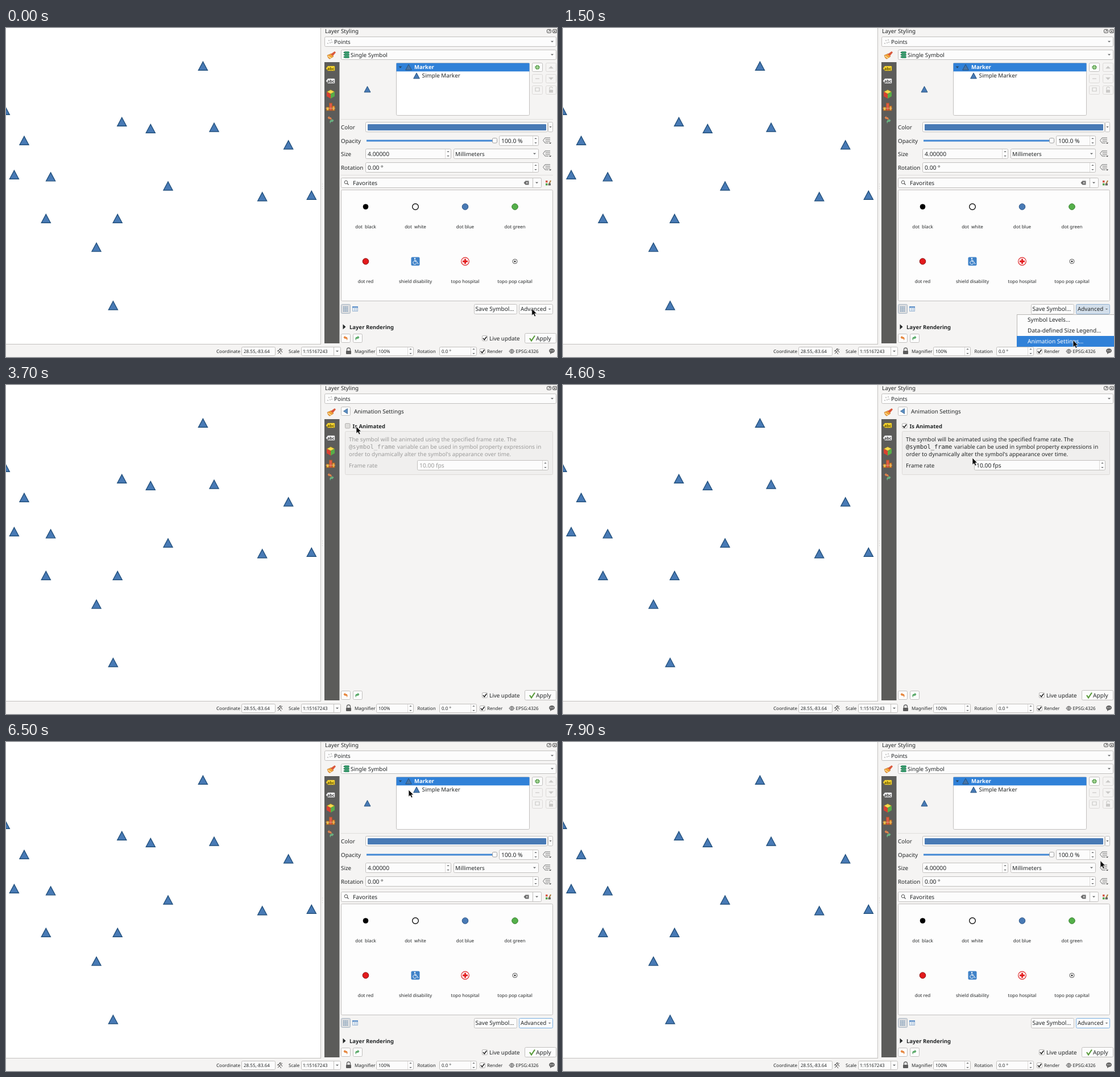
An HTML page for the animation above (8000 ms loop, 969 by 578 pixels).

```html
<!DOCTYPE html>
<html lang="en">
<head>
<meta charset="utf-8">
<title>Layer styling</title>
<style>
html, body { margin: 0; width: 100%; height: 100%; overflow: hidden; background: #f5f4f3; }
svg { display: block; width: 969px; height: 578px; }
text { font-family: "Noto Sans", sans-serif; font-size: 9.85px; fill: #232627; white-space: pre; text-rendering: geometricPrecision; }
.small { font-size: 8.05px; }
.bold { font-size: 9.5px; font-weight: 700; }
.wide { font-size: 10.15px; }
.value { font-size: 10.3px; }
.mono { font-family: "DejaVu Sans Mono", monospace; font-size: 10.4px; }
.tag { font-size: 7px; font-weight: 700; }
#group text { fill: inherit; }
</style>
</head>
<body>
<svg id="stage" viewBox="0 0 969 578"></svg>
<script>
const LOOP = 8000, STEP = 100;
const BLUE = '#487ab5', EDGE = '#24527f', LINE = '#c2c0be', SELECT = '#3081d8';

const rect = (x, y, w, h, fill, stroke = 'none', r = 0, extra = '') =>
  `<rect x="${x}" y="${y}" width="${w}" height="${h}" rx="${r}" fill="${fill}" stroke="${stroke}" ${extra}/>`;
const text = (x, y, s, cls = '', extra = '') => `<text x="${x}" y="${y}" class="${cls}" ${extra}>${s}</text>`;
const path = (d, fill, stroke = 'none', w = 1) =>
  `<path d="${d}" fill="${fill}" stroke="${stroke}" stroke-width="${w}"/>`;
const circle = (x, y, r, fill, stroke = 'none', w = 1) =>
  `<circle cx="${x}" cy="${y}" r="${r}" fill="${fill}" stroke="${stroke}" stroke-width="${w}"/>`;
const line = (x1, y1, x2, y2, color = LINE, w = 1) => path(`M${x1} ${y1}L${x2} ${y2}`, 'none', color, w);
const box = (x, y, w, h, fill = '#fcfcfc', stroke = LINE) => rect(x + .5, y + .5, w - 1, h - 1, fill, stroke, 2);
const down = (x, y, c = '#686a6b', s = 2.6) => path(`M${x - s} ${y - s / 2}h${2 * s}l${-s} ${s}z`, c);
const up = (x, y, c = '#686a6b', s = 2.6) => path(`M${x - s} ${y + s / 2}h${2 * s}l${-s} ${-s}z`, c);
const marker = (x, y, s = 8, fill = BLUE, w = 1.4) =>
  path(`M${x} ${y - s}L${x + s} ${y + s * .87}H${x - s}Z`, fill, EDGE, w);
const tick = (x, y, c = '#222', w = 1.6) => path(`M${x - 3} ${y}l2.3 2.7l4-5.5`, 'none', c, w);
const checkbox = (x, y, on = true) => rect(x - 4.5, y - 4.5, 9, 9, '#fff', '#b5b3b1', 1.5) + (on ? tick(x, y) : '');

function spin(x, y, w, value, h = 18, cls = 'value') {
  const ax = x + w - 5.5, my = y + h / 2;
  return box(x, y, w, h) + line(x + w - 10.5, y + 1, x + w - 10.5, y + h - 1, '#dddbd9') +
    up(ax, my - 4, '#686a6b', 2.2) + down(ax, my + 4, '#686a6b', 2.2) +
    text(x + 4, my + (cls === 'small' ? 3 : 3.6), value, cls);
}
const combo = (x, y, w, label, dx, h = 18) =>
  box(x, y, w, h) + down(x + w - 7.5, y + h / 2) + text(x + dx, y + h / 2 + 3.6, label);
const override = y =>
  path(`M944.5 ${y - .5}l3.5-4.5h9M944.5 ${y - .5}l3.5 4.5h6`, 'none', '#6d6e6f', 1) +
  line(948.5, y - 2, 957, y - 2, '#777') + line(948.5, y + 1, 957, y + 1, '#777') +
  down(957, y + 4.5, '#333', 2.2);
const swirl = (x, y, c, flip = 1) =>
  `<g transform="translate(${x} ${y}) scale(${flip} 1)">` +
  path('M-3.5-1.5L-.5-4.5V-2.5C4-2.5 4.5 1 2.5 4C2.5 1.5 1.5 .5-.5.5V1.7Z', c) + '</g>';

function mapView() {
  const points = [[346.4, 67.3], [-1.7, 145.3], [203.8, 165.3], [254.3, 177.3], [366, 175], [32, 198.3], [496.7, 205.8],
    [14.4, 258.3], [78.6, 261.9], [285, 278], [450.7, 296.8], [537.3, 294.3], [70.3, 335.3], [196.2, 335.3],
    [159, 385.7], [188.4, 488]];
  return rect(0, 0, 553, 555, '#fff') + line(553.5, 0, 553.5, 556) + line(0, 555.5, 554, 555.5) +
    points.map(p => marker(...p)).join('') +
    [274, 278, 282].map(y => circle(556.5, y, .6, '#c4c2c0')).join('');
}

function sideTabs() {
  const tag = (y, fill, color) =>
    path(`M562.5 ${y}l3.5-4.5h11a1.5 1.5 0 0 1 1.5 1.5v6a1.5 1.5 0 0 1-1.5 1.5h-11z`, fill, '#444', .5) +
    text(565, y + 2.5, 'abc', 'tag', `style="fill:${color}"`);
  return rect(560, 60, 26.5, 494, '#5c5c5a') +
    path('M565 48l7-3 4 5-6 4q-3 1-5-6z', '#f0a13a', '#b66c22', .6) +
    path('M571 46l7-5 2 2-5 6z', '#d9583b') + line(566, 49, 572, 53, '#fff1b0', 1.2) +
    tag(71, '#f7d631', '#5a4a00') + tag(93, '#f4f4f4', '#333') +
    path('M571 108.5l7 3.5-7 4-7-4z', '#f5d94a', '#873') +
    path('M564 112l7 4v8l-7-4z', '#d84232') + path('M578 112l-7 4v8l7-4z', '#58ad48') +
    rect(563.5, 139, 4.5, 6, '#e9bd3f', '#a65b25') + rect(568.5, 132, 5, 13, '#df5a45', '#a65b25') +
    rect(574, 137, 4, 8, '#eda63b', '#a65b25') + line(562, 141, 579, 141, '#e4d3a0', .7) +
    swirl(569, 159, '#e2854d') + swirl(573, 164, '#69b483', -1);
}

function frameParts() {
  const dots = [[566, 27], [568, 22], [570, 26], [572, 21], [573, 25]];
  return text(561, 9, 'Layer Styling') +
    rect(951.5, 2.5, 7, 6, '#f5f4f3', '#555', 1.5) + path('M953.5 7l3-3M954.5 4h2v2', 'none', '#444', .8) +
    rect(961.5, 2.5, 7, 6, '#f5f4f3', '#555', 1.5) + path('M963 4l4 3.5M967 4l-4 3.5', 'none', '#444', 1) +
    combo(560, 15, 408, 'Points', 17) + dots.map(([x, y]) => circle(x, y, .8, '#8a8a8a')).join('') +
    box(589, 537, 17, 16) + swirl(597, 545, '#e58236') + box(610, 537, 17, 16) + swirl(618, 545, '#57a866', -1) +
    checkbox(842, 545) + text(850, 548.5, 'Live update') +
    box(912, 536, 56, 18) + path('M921 545l3 4.5l6-9', 'none', '#5a9b3c', 2.2) + text(932, 548.5, 'Apply', 'wide');
}

function statusBar() {
  const label = (x, s) => text(x, 571, s, 'small');
  return label(370, 'Coordinate') + box(414, 560, 60, 16) + label(418, '28.55,-83.64') +
    path('M478 566l6 7M478 572l8-8M481 563l5 7M477 568l7-5', 'none', '#444', 1) +
    label(497, 'Scale') + box(519, 560, 70, 16) + line(576.5, 561, 576.5, 575) + down(582.5, 568) + label(522, '1:15167243') +
    path('M599.5 567v-2a3 3 0 0 1 6 0v2', 'none', '#666', 1.3) + rect(598, 567, 9, 6, '#5c5c5c', 'none', 1) +
    label(613, 'Magnifier') + spin(651, 560, 66, '100%', 16, 'small') +
    label(723.5, 'Rotation') + spin(762, 560, 66, '0.0 °', 16, 'small') +
    checkbox(838, 568) + label(846, 'Render') +
    circle(889.5, 568, 3.6, '#ddd', '#555', .8) +
    path('M884 568h11M889.5 564v8M887 565.5q2.5 1.5 5 0M887 570.5q2.5-1.5 5 0', 'none', '#555', .6) +
    label(896.5, 'EPSG:4326') +
    path('M955 567a5 4 0 0 1 10 0a5 4 0 0 1-5 4l-3 2v-2.5a5 4 0 0 1-2-3.5z', '#666') +
    [957.5, 960, 962.5].map(x => circle(x, 567, .7, '#fff')).join('');
}

function symbolTree() {
  const icons = ['M934.5 65v8M930.5 69h8', 'M931 89h7', 'M931 105h7v6h-7z'];
  const buttons = icons.map((d, i) =>
    box(925, 61 + 20 * i, 19, 16, i ? '#f5f4f3' : '#fcfcfc', i ? '#dcdad8' : LINE) +
    path(d, 'none', i ? '#c9c8c6' : '#3f8a3a', i ? 1.2 : 4) + (i ? '' : path(d, 'none', '#b9e3a6', 1.6)) +
    box(949, 61 + 20 * i, 19, 16, '#f5f4f3', '#dcdad8')).join('');
  return marker(635.5, 108, 5.5, BLUE, 1) + box(686, 61, 235, 93, '#fff') + rect(686.5, 61.7, 234, 14.6, SELECT) +
    down(693.5, 69, '#24425f', 2.8) + marker(708, 69.3, 5.3, '#4a75a5', 1) +
    text(718, 72.4, 'Marker', 'bold', 'style="fill:#fff"') +
    marker(722, 84.2, 5.3, BLUE, 1) + text(731.5, 87.2, 'Simple Marker') + buttons +
    up(958.5, 69, '#c9c8c6', 4.5) + down(958.5, 89, '#c9c8c6', 4.5) +
    rect(955, 108.5, 7, 5, '#c9c8c6') + path('M956 108v-2a2.5 2.5 0 0 1 5 0', 'none', '#c9c8c6', 1.2);
}

function symbolGallery() {
  const xs = [632.5, 720, 807.5, 895];
  const names = ['dot  black', 'dot  white', 'dot blue', 'dot green',
    'dot red', 'shield disability', 'topo hospital', 'topo pop capital'];
  const labels = names.map((s, i) =>
    text(xs[i % 4], i < 4 ? 352.4 : 448.4, s, 'small', 'text-anchor="middle"')).join('');
  return box(589, 284, 373, 196, '#fdfdfd') + labels +
    circle(xs[0], 314, 4.8, '#000') + circle(xs[1], 314, 5.3, '#fff', '#111', 1.4) +
    circle(xs[2], 314, 5.3, BLUE, '#2c5486') + circle(xs[3], 314, 5.3, '#54b04a', '#37802f') +
    circle(xs[0], 410, 5.3, '#e31a1c', '#891517') +
    rect(712.5, 402.5, 15, 15, '#3f82c8', 'none', 2) + circle(719, 405, 1.2, '#fff') +
    path('M719 406.5v4h3.5l1.8 3.8l1.2-.6M719 408.5h3M717.7 409.3a3.1 3.1 0 1 0 4.2 3.7', 'none', '#fff', 1) +
    circle(xs[2], 410, 6.8, '#fff', '#dd2427', 1.2) + path('M807.5 405.5v9M803 410h9', 'none', '#e31a1c', 2.8) +
    circle(xs[3], 410, 4, '#fff', '#444', .9) + circle(xs[3], 410, 1.5, '#222');
}

function symbolPage() {
  const stack = [41.5, 45.5, 49.5].map(y => rect(595, y, 8.5, 3, '#2e9a68', '#1f734c', 1, 'stroke-width=".6"') +
    circle(594.5, y + 1.5, 1, '#1f734c')).join('');
  const grid = [0, 1, 2, 3].map(i => line(593, 490 + 2.5 * i, 601.5, 490 + 2.5 * i, '#6f8fb0', 1.2)).join('') +
    [0, 1, 2].map(i => line(595.5 + 3 * i, 489, 595.5 + 3 * i, 499, '#d8dde3', .8)).join('');
  return combo(589, 38, 379, 'Single Symbol', 17) + stack + symbolTree() + line(589, 160.5, 962, 160.5, '#e0dedc') +
    text(589, 178, 'Color') + box(632, 165, 321, 18) + rect(636, 169, 314, 11, BLUE, 'none', 1) +
    box(953, 165, 9, 18) + down(957.5, 174, '#555', 2.2) +
    text(589, 201.5, 'Opacity') + line(634, 198, 857, 198, '#4288d4', 3) + rect(855.5, 193.5, 8, 8.5, '#fff', '#9c9c9c', 2) +
    spin(867, 189, 70, '100.0 %') + override(198) +
    text(589, 225, 'Size') + spin(632, 212, 151, '4.00000') + combo(787, 212, 150, 'Millimeters', 3) + override(221) +
    text(589, 249, 'Rotation') + spin(632, 236, 305, '0.00 °') + override(245) +
    line(589, 258.5, 962, 258.5, '#e0dedc') +
    box(589, 263, 353, 18) + circle(598, 271, 2.8, 'none', '#555') + line(600, 273, 602.5, 275.5, '#555', 1.2) +
    text(610, 275.5, 'Favorites', 'wide') + path('M910.5 272l3-3.5h6v7h-6z', '#696969') +
    path('M914.5 270.3l3.3 3.3M917.8 270.3l-3.3 3.3', 'none', '#fff', .9) + line(926.5, 264, 926.5, 280) + down(933.5, 272) +
    rect(949, 268, 3.5, 3.5, '#d55745') + rect(949, 273, 3.5, 3.5, '#51a34c') + path('M954 276l4-8', 'none', '#a87938', 2) +
    rect(954, 273, 4, 3.5, '#666') + symbolGallery() +
    box(589, 485, 17, 17, '#dadcdf', '#a9b6c4') + grid +
    rect(609.5, 489.5, 9, 8, '#eaf1f8', '#9db7d3') + rect(609, 489, 10, 2.5, '#5c8fca') + line(613, 490, 613, 498, '#9db7d3') +
    line(616, 490, 616, 498, '#9db7d3') + box(823, 485, 76, 18) + text(825.5, 497, 'Save Symbol…', 'wide') +
    '<rect id="advanced" x="902.5" y="485.5" width="59" height="17" rx="2"/>' +
    text(905, 497, 'Advanced') + down(956, 494, '#686a6b', 2.2) +
    path('M592.5 520.5v9l5-4.5z', '#232627') + text(604, 529, 'Layer Rendering', 'bold');
}

function settingsPage() {
  return '<rect id="back" x="589.5" y="38.5" width="16" height="15" rx="2"/>' +
    path('M600.5 41.5v9l-7-4.5z', '#5b8fc4', '#35618f', .8) + text(612, 49.5, 'Animation Settings') +
    '<rect id="check" x="596.5" y="67.5" width="8.5" height="8.5" rx="1.5" stroke="#b5b3b1"/>' +
    `<g id="tick">${tick(600.7, 72)}</g>` + text(609.5, 75.7, 'Is Animated', 'bold') +
    rect(596.5, 81.5, 365, 76, '#f0efee', '#dcdad8', 2) + '<g id="group">' +
    text(603, 98.5, 'The symbol will be animated using the specified frame rate. The') +
    text(603, 111.5, '@symbol_frame', 'mono') +
    text(688, 111.5, 'variable can be used in symbol property expressions in') +
    text(603, 124.5, "order to dynamically alter the symbol's appearance over time.") +
    text(603, 144.7, 'Frame rate') + spin(723, 132, 231, '10.00 fps') + '</g>';
}

const menuItems = ['Symbol Levels…', 'Data-defined Size Legend…', 'Animation Settings…'];
const menu = rect(798.5, 503.5, 172, 56, '#fcfcfc', '#b9b7b5') +
  `<rect id="hover" x="798" width="171" height="19" fill="${SELECT}"/>` +
  menuItems.map((s, i) => text(817, 516 + 19 * i, s, 'item wide')).join('');

const stage = document.getElementById('stage');
stage.innerHTML = rect(0, 0, 969, 578, '#f5f4f3') + mapView() + sideTabs() + frameParts() + statusBar() +
  `<g id="symbol">${symbolPage()}</g><g id="settings">${settingsPage()}</g><g id="menu">${menu}</g><g id="cursor">` +
  '<path d="M0 0V12.2L2.8 9.7L4.9 14L7.1 13L5.1 8.8H8.8Z" fill="#0b0b0b" stroke="#fff" stroke-width=".7"/></g>';

// Pointer track: time, x, y
const track = [
  [0, 924.7, 493], [900, 924.7, 493], [1000, 909, 506], [1200, 902, 524], [1500, 897, 548.5], [2600, 897, 548.5],
  [2800, 848, 470], [3200, 672, 190], [3400, 621, 92], [3500, 613, 74], [3600, 616, 73], [4000, 616, 73],
  [4300, 653, 93], [4600, 720, 128], [4700, 728, 134], [4800, 728, 133], [5000, 704, 117], [5400, 616, 63],
  [5700, 594, 49], [6100, 594, 49], [6300, 636, 59], [6500, 708, 84], [6800, 868, 168], [7000, 928, 198.5],
  [7200, 933, 213], [7500, 941, 231], [7700, 945, 222], [7900, 945, 208.5], [8000, 945, 208.5]
];

function pointerAt(t) {
  const i = Math.max(1, track.findIndex(k => k[0] >= t));
  const [t0, x0, y0] = track[i - 1], [t1, x1, y1] = track[i];
  const p = (t - t0) / (t1 - t0);
  return [x0 + (x1 - x0) * p, y0 + (y1 - y0) * p];
}

const el = id => document.getElementById(id);
const show = (id, on) => el(id).setAttribute('display', on ? 'inline' : 'none');
const paint = (id, fill, stroke) => { el(id).setAttribute('fill', fill); el(id).setAttribute('stroke', stroke); };
const items = [...document.querySelectorAll('.item')];

function render(time) {
  const t = Math.floor((time % LOOP) / STEP) * STEP;
  const [x, y] = pointerAt(t);
  const settings = t >= 2200 && t < 5900, opened = t >= 500 && t < 2200, checked = t >= 3800;
  show('symbol', !settings);
  show('settings', settings);
  show('menu', opened);
  show('tick', checked);
  el('cursor').setAttribute('transform', `translate(${x} ${y})`);

  const row = opened && y > 503 ? Math.min(2, Math.floor((y - 503) / 19)) : -1;
  show('hover', row >= 0);
  el('hover').setAttribute('y', 503 + 19 * Math.max(0, row));
  items.forEach((item, i) => { item.style.fill = i === row ? '#fff' : ''; });

  if (opened) paint('advanced', '#d3dfeb', '#92b1d1');
  else paint('advanced', '#fcfcfc', t >= 5900 ? '#78aee2' : LINE);
  paint('check', t >= 3600 && !checked ? '#dedddb' : '#fff', '#b5b3b1');
  paint('back', '#fcfcfc', t >= 5500 ? '#a9c4de' : LINE);
  el('group').style.fill = checked ? '#232627' : '#9b9b9a';
}

const start = performance.now();
(function tickFrame() {
  render(performance.now() - start);
  requestAnimationFrame(tickFrame);
})();
</script>
</body>
</html>
```
